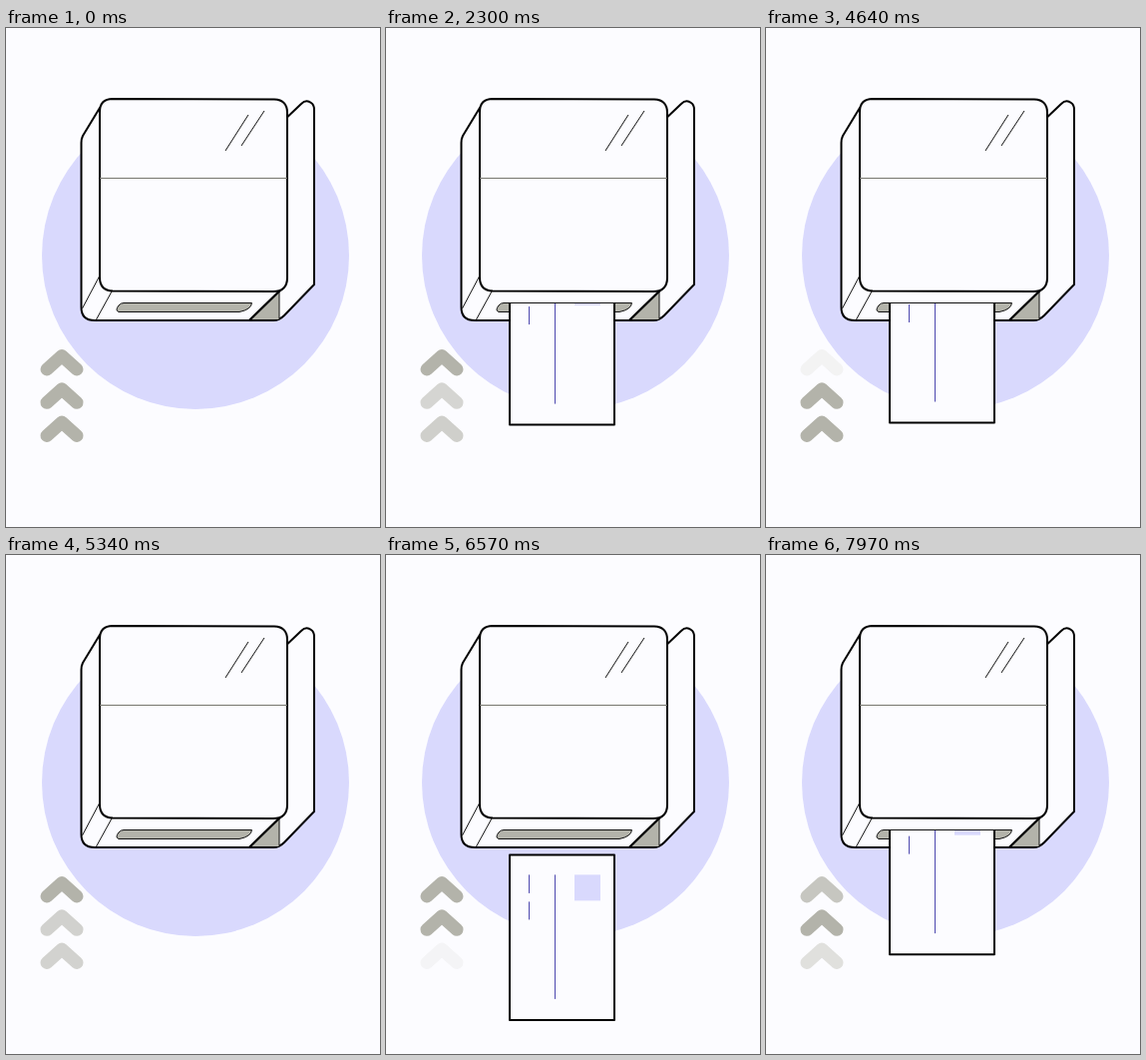
Write an HTML page that moves like this. It is 375x500 px and loops after 8 s.

```html
<!DOCTYPE html>
<html lang="en">
<head>
<meta charset="utf-8">
<title>Card reader</title>
<style>
  html, body { margin: 0; width: 100%; height: 100%; overflow: hidden; background: #fcfcff; }
  svg { display: block; width: 100%; height: 100%; }
  .outline { stroke: #000; stroke-width: 2; stroke-linejoin: round; stroke-linecap: round; }
  .thin { stroke: #111; stroke-width: 1; fill: none; }
  .ink { stroke: #4d48ae; stroke-width: 1; fill: none; }
  .paper { fill: #fcfcff; }
  .grey { fill: #b3b3aa; }
  .lilac { fill: #d9d9fd; }
  .chevron { fill: none; stroke: #b3b3aa; stroke-width: 13; stroke-linecap: round; stroke-linejoin: round; }
</style>
</head>
<body>
<svg viewBox="0 0 375 500">
  <defs>
    <clipPath id="belowSlot"><rect y="275" width="375" height="225"/></clipPath>
  </defs>

  <circle class="lilac" cx="190" cy="228" r="154"/>

  <!-- back panel and body -->
  <path class="paper outline" d="M274 97 L296 76 Q301 71 306 75 Q309 77 309 82 V257 L279 288 Q274 293 268 293 H244 Z"/>
  <path class="paper outline" d="M94 80 L77 108 Q75.500 111 75.500 115 V280 Q75.500 293 89 293 H244 L279 259 Z"/>
  <path class="grey" d="M274 264 V292 H246 Z"/>
  <path class="thin" d="M274 264 V292 M94 248 L76.500 281 M106 264 L90 293"/>
  <path class="outline" d="M279 259 L244 293 H268" fill="none"/>

  <!-- front face -->
  <path class="paper outline" d="M107 71 L269 71.500 Q282 72 282 85 V250 Q282 264 268 264 L107 263.500 Q94 263 94 250 V84 Q94 71 107 71 Z"/>
  <path class="thin" d="M94 150.500 H282" style="stroke:#77776f"/>
  <path class="thin" d="M243 87 L220 123 M259 83 L236 118"/>

  <path class="grey thin" d="M118 275.500 H246.500 Q246 282 234 284.500 H113 Q109 283 113 278 Q115 275.500 118 275.500 Z" style="fill:#b3b3aa"/>

  <g clip-path="url(#belowSlot)">
    <g id="card">
      <rect class="paper outline" x="124" width="105" height="165.500"/>
      <path class="ink" d="M143.500 20 V38.500 M143.500 47 V65 M169.500 20 V144.500"/>
      <rect class="lilac" x="189" y="20" width="26" height="26"/>
    </g>
  </g>
  <path class="thin" id="slotEdge" d="M124 275.500 H229"/>

  <g id="chevrons"></g>
</svg>
<script>
const LOOP = 8000;
const CARD_CYCLE = 5810;
const WAVE = 1530;
const STAGGER = WAVE / 3;

const card = document.getElementById('card');
const group = document.getElementById('chevrons');
const clamp = x => Math.min(1, Math.max(0, x));
const ramp = (t, from, to) => clamp((t - from) / (to - from));

// Listed bottom to top, the direction in which the pulse travels.
const chevrons = [342 + 66.5, 342 + 33.3, 342].map(y => {
  const path = document.createElementNS('http://www.w3.org/2000/svg', 'path');
  path.setAttribute('class', 'chevron');
  path.setAttribute('d', `M41 ${y} L56 ${y - 13.5} L71 ${y}`);
  return group.appendChild(path);
});

function pulse(t) {
  if (t < 0) return 1;
  return clamp(Math.abs(t % WAVE - 500) / 450);
}

function render(t) {
  const c = t % CARD_CYCLE;
  const slide = Math.sin(ramp(c, 751, 2586) * Math.PI / 2);
  card.setAttribute('transform', `translate(0 ${301 - 71 * slide})`);
  card.setAttribute('opacity', ramp(c, 200, 650) * (1 - ramp(c, 4800, 5200)));
  chevrons.forEach((path, i) => path.setAttribute('opacity', pulse(t - i * STAGGER)));
}

const start = performance.now();
function tick() {
  render((performance.now() - start) % LOOP);
  requestAnimationFrame(tick);
}
tick();
</script>
</body>
</html>
```
